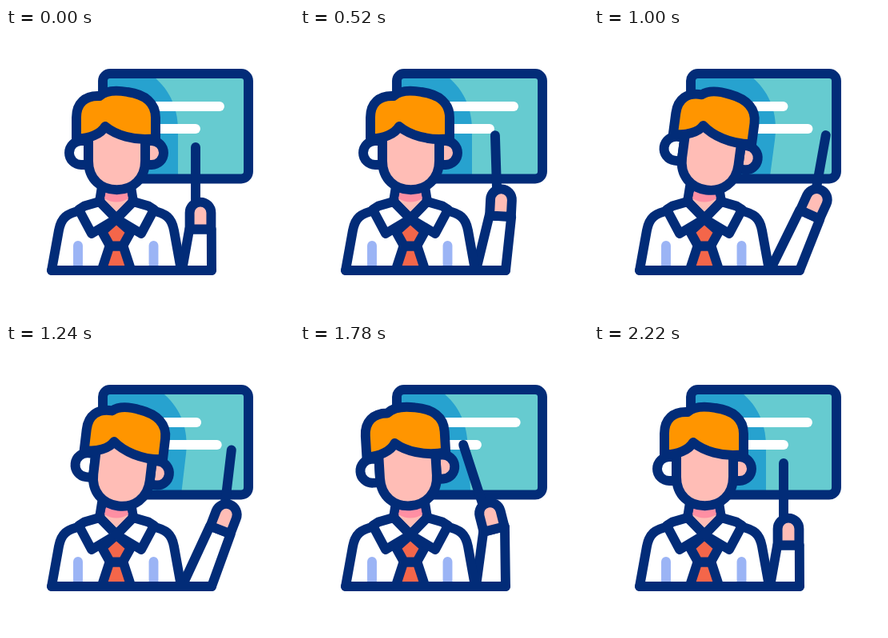
Animation of 360 by 360 pixels, one loop 2420 ms. Source, as an HTML page:

```html
<!DOCTYPE html>
<html lang="en">
<head>
<meta charset="utf-8">
<title>Teacher at the board</title>
<style>
  html, body { margin: 0; width: 100%; height: 100%; overflow: hidden; background: #fff; }
  svg { display: block; width: 100vw; height: 100vh; }
  .ink { stroke: #022c78; stroke-width: 11.9; stroke-linecap: round; stroke-linejoin: round; }
  .none { fill: none; }
  .white { fill: #fff; }
  .skin { fill: #ffbdb6; }
  .hair { fill: #ff9500; }
  .tie { fill: #f4664a; }
  .chalk { stroke: #fff; stroke-width: 11.9; stroke-linecap: round; }
  .fold { stroke: #9bb4f5; stroke-width: 11.9; stroke-linecap: round; }
</style>
</head>
<body>
<svg viewBox="0 0 360 360">
  <defs>
    <clipPath id="panel"><rect x="121" y="57" width="182" height="131.500" rx="9"/></clipPath>
  </defs>

  <g id="board">
    <rect x="121" y="57" width="182" height="131.500" rx="9" fill="#66cbd0"/>
    <g clip-path="url(#panel)">
      <path id="shade" d="M60 215V40H140C190 52 215 85 215 128V215Z" fill="#27a2cf"/>
    </g>
    <line id="line1" class="chalk" x1="165" y1="98" x2="267" y2="98"/>
    <line id="line2" class="chalk" x1="165" y1="126" x2="237" y2="126"/>
    <rect class="ink none" x="121" y="57" width="182" height="131.500" rx="9"/>
  </g>

  <g id="arm">
    <path id="sleeve" class="ink white"/>
    <line id="pointer" class="ink"/>
    <path id="hand" class="ink skin" d="M-13.400 0V-20.500A13.400 13.400 0 0 1 13.400 -20.500V0Z"/>
  </g>

  <g id="body">
    <path class="ink white" d="M57 303L66 253C69 237 76 232 93 228H183C200 232 207 237 210 253L219 303Z"/>
    <line class="fold" x1="90" y1="272" x2="90" y2="297"/>
    <line class="fold" x1="184.500" y1="272" x2="184.500" y2="297"/>
    <path class="ink none" d="M57 303H257"/>
    <path class="ink skin" d="M120 198L117 217L138 238.500L159 217L156 198Z"/>
    <path d="M126 200H150L153 213Q138 222 123 213Z" fill="#ff8fa3"/>
    <path class="ink tie" d="M129.500 272.500L119.500 303H156.500L146.500 272.500Z"/>
    <path class="ink tie" d="M138 238.500L120 254.500L130 272.500H146L156 254.500Z"/>
    <path class="ink white" d="M117 217L98 222.500L91 227L107 257L138 238.500Z"/>
    <path class="ink white" d="M159 217L178 222.500L185 227L169 257L138 238.500Z"/>
  </g>

  <g id="head">
    <path class="ink white" d="M103 141H94A15 15 0 0 0 94 171H103Z"/>
    <path class="ink skin" d="M174 141H182A15 15 0 0 1 182 171H174Z"/>
    <path class="ink skin" d="M103 125V166C103 189 119 202.300 138.500 202.300S174 189 174 166V125Z"/>
    <path class="ink hair" d="M88 138V112C88 94 99 84 117 85C126 77 141 78 152 80C174 83 187 94 187 112V138C160 142 136 133 124 123C119 132 104 139 88 138Z"/>
  </g>
</svg>

<script>
  const LOOP = 2420, MOVE = 2220, STEP = 20;
  const CUFF = 13.8;

  // One pose per quarter of the movement; the last returns to the first.
  const POSES = [
    { head: 0,    l1: 267, l2: 237, hx: 243,   hy: 251.5, turn: 0,   tx: 237, ty: 149 },
    { head: 0,    l1: 267, l2: 237, hx: 250.5, hy: 235,   turn: 3,   tx: 244, ty: 134 },
    { head: 8.4,  l1: 233, l2: 271, hx: 272,   hy: 233,   turn: 27,  tx: 295, ty: 134 },
    { head: -3.8, l1: 270, l2: 219, hx: 242.5, hy: 229,   turn: -16, tx: 200, ty: 123 }
  ];
  POSES.push(POSES[0]);

  const el = id => document.getElementById(id);
  const set = (id, attrs) => {
    for (const name in attrs) el(id).setAttribute(name, attrs[name]);
  };
  const ease = u => u * u * (3 - 2 * u);

  function poseAt(t) {
    const pos = Math.min(t / MOVE, 1) * 4;
    const i = Math.min(Math.floor(pos), 3);
    const k = ease(pos - i);
    const pose = {};
    for (const key in POSES[i]) {
      pose[key] = POSES[i][key] + (POSES[i + 1][key] - POSES[i][key]) * k;
    }
    return pose;
  }

  function draw(t) {
    const p = poseAt(t);
    const a = p.turn * Math.PI / 180, cos = Math.cos(a), sin = Math.sin(a);
    const onHand = (x, y) => [p.hx + x * cos - y * sin, p.hy + x * sin + y * cos];
    const base = onHand(-6, -32);
    const tilt = `rotate(${p.head} 138 218)`;

    set("head", { transform: tilt });
    set("shade", { transform: tilt });
    set("line1", { x2: p.l1 });
    set("line2", { x2: p.l2 });
    set("hand", { transform: `translate(${p.hx} ${p.hy}) rotate(${p.turn})` });
    set("pointer", { x1: p.tx, y1: p.ty, x2: base[0], y2: base[1] });
    set("sleeve", { d: `M220 303L${onHand(-CUFF, 0)}L${onHand(CUFF, 0)}L257 303Z` });
  }

  const start = performance.now();
  function tick() {
    const t = (performance.now() - start) % LOOP;
    draw(Math.floor(t / STEP) * STEP);
    requestAnimationFrame(tick);
  }
  draw(0);
  requestAnimationFrame(tick);
</script>
</body>
</html>
```
